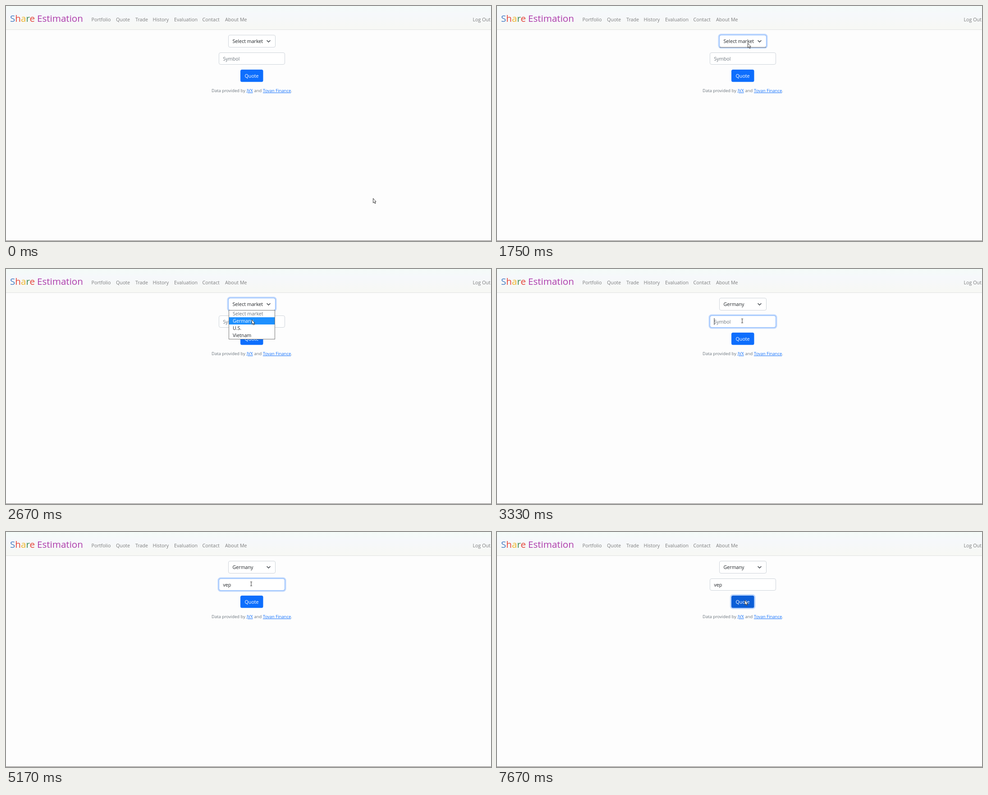
Write an HTML page that moves like this. It is 1076x521 px and loops after 8000 ms.

```html
<!DOCTYPE html>
<html lang="en">
<head>
<meta charset="utf-8">
<title>Quote</title>
<style>
  html, body { margin: 0; width: 100%; height: 100%; overflow: hidden; background: #fdfdfd; }
  svg { display: block; width: 1076px; height: 521px; font: 10.7px "Open Sans", "Noto Sans", sans-serif; fill: #212529; }
  .title { font-size: 20.6px; }
  .nav { fill: #7c7d7e; }
  .hint { fill: #6c757d; }
  .small { font-size: 9.45px; fill: #6c757d; }
  .small .link { fill: #0d6efd; text-decoration: underline; }
  .box { fill: #fff; stroke: #ced4da; }
  .ring rect { fill: none; stroke: #0d6efd; stroke-opacity: .25; stroke-width: 3; }
  .ring .edge { stroke: #86b7fe; stroke-opacity: 1; stroke-width: 1; }
</style>
</head>
<body>
<svg viewBox="0 0 1076 521">
  <defs>
    <linearGradient id="bar" x2="0" y2="1">
      <stop stop-color="#f4fbf8"/>
      <stop offset=".35" stop-color="#f6f8fb"/>
      <stop offset="1" stop-color="#f7f8f4"/>
    </linearGradient>
  </defs>
  <rect width="1076" height="52" fill="url(#bar)"/>
  <rect y="52" width="1076" height="1" fill="#e1e2e2"/>
  <rect y="520" width="1076" height="1" fill="#77716f"/>

  <text class="title" x="9" y="35"><tspan fill="#4a7fc4">S</tspan><tspan fill="#e5483c">h</tspan><tspan fill="#efb62f">a</tspan><tspan fill="#3b8a55">r</tspan><tspan fill="#e5483c">e</tspan></text>
  <text class="title" x="69" y="35" fill="#ad3bab">Estimation</text>
  <g id="nav" class="nav"></g>

  <rect class="box" x="493.5" y="64.5" width="104" height="27" rx="3.5"/>
  <g id="selectRing" class="ring">
    <rect x="492" y="63" width="107" height="30" rx="5"/>
    <rect class="edge" x="493.5" y="64.5" width="104" height="27" rx="3.5"/>
  </g>
  <text id="market" x="502.5" y="82"></text>
  <path d="M579 76.5l3.5 3.5 3.5-3.5" fill="none" stroke="#343a40" stroke-width="1.4" stroke-linecap="round" stroke-linejoin="round"/>

  <rect class="box" x="472.5" y="103.5" width="146" height="26" rx="3.5"/>
  <g id="inputRing" class="ring">
    <rect x="471" y="102" width="149" height="29" rx="5"/>
    <rect class="edge" x="472.5" y="103.5" width="146" height="26" rx="3.5"/>
  </g>
  <text id="symbol" x="481.5" y="120.5"></text>
  <rect id="caret" y="109" width="1" height="15"/>

  <g id="buttonRing" class="ring"><rect x="518.5" y="139.5" width="53.5" height="30" rx="5"/></g>
  <rect id="button" x="520" y="141" width="50.5" height="27.3" rx="3.5"/>
  <text x="529.5" y="159" fill="#fff">Quote</text>

  <g class="small">
    <text x="456" y="191">Data provided by</text>
    <text class="link" x="534" y="191">JVX</text>
    <text x="550.5" y="191">and</text>
    <text x="570" y="191"><tspan class="link">Tovan Finance</tspan>.</text>
  </g>

  <g id="menu">
    <rect id="menuBox" x="494.5" y="91.5" width="102" height="64" fill="#fff" stroke="#767676"/>
    <g id="items">
      <rect id="hover" x="495" y="107" width="101" height="16" fill="#1e90ff"/>
      <text class="hint" x="503" y="103">Select market</text>
      <text id="germany" x="503" y="119">Germany</text>
      <text x="503" y="135">U.S.</text>
      <text x="503" y="151">Vietnam</text>
    </g>
  </g>

  <path id="arrow" d="M.5 .5v10l2.3-2 1.6 3.5 1.6-.7-1.6-3.4h2.7z" fill="#fff" stroke="#222" stroke-width=".9"/>
  <path id="beam" d="M-2 -4.5h1.5l.5 .5 .5-.5H2M0-4V4M-2 4.5h1.5l.5-.5 .5 .5H2" fill="none" stroke="#333"/>
</svg>
<script>
const LOOP = 8000;
const $ = id => document.getElementById(id);
const show = (id, on) => $(id).setAttribute('visibility', on ? 'visible' : 'hidden');
const fade = (id, value) => $(id).setAttribute('opacity', value);
const ramp = (t, from, to) => Math.min(1, Math.max(0, (t - from) / (to - from)));
const within = (t, from, to) => t >= from && t < to;
const latest = (steps, t) => steps.filter(step => step[0] <= t).pop();

const links = [[189.5, 'Portfolio'], [244, 'Quote'], [287, 'Trade'], [325.5, 'History'],
  [373, 'Evaluation'], [435.5, 'Contact'], [486, 'About Me'], [1035.5, 'Log Out']];
$('nav').innerHTML = links.map(([x, label]) => `<text x="${x}" y="33.5">${label}</text>`).join('');

const pointer = [[0, 814, 426], [420, 797, 401.5], [830, 757, 351], [1000, 709, 287],
  [1080, 652, 211], [1170, 600, 141], [1330, 577, 109], [1420, 562, 90], [1500, 556, 82],
  [2170, 554, 90], [2420, 551, 108], [2580, 547, 111], [2670, 545, 112], [2920, 544, 115],
  [5830, 547, 127], [5920, 552, 141], [6080, 551, 147], [6170, 549, 150], [7580, 549.5, 151]];
const typing = [[0, ''], [4330, 'v'], [4420, 've'], [4580, 'vep']];

function draw(t) {
  $('market').textContent = t < 2920 ? 'Select market' : 'Germany';
  fade('selectRing', ramp(t, 1500, 1670) * (t < 3250));
  fade('inputRing', ramp(t, 3200, 3330) - ramp(t, 6580, 6750));
  fade('buttonRing', ramp(t, 6580, 6750));

  const typed = latest(typing, t)[1];
  const symbol = $('symbol');
  symbol.textContent = typed || 'Symbol';
  symbol.setAttribute('class', typed ? '' : 'hint');
  $('caret').setAttribute('x', typed ? 482 + symbol.getComputedTextLength() : 481.5);
  show('caret', within(t, 3250, 4000) || within(t, 4330, 5170) || within(t, 5580, 6080));
  $('button').setAttribute('fill', t < 6080 ? '#0d6efd' : within(t, 6580, 7080) ? '#0a58ca' : '#0b5ed7');

  const open = within(t, 1920, 2920), hover = open && t >= 2420;
  show('menu', within(t, 1750, 2920));
  $('menuBox').setAttribute('height', open ? 64 : .1);
  fade('items', open ? 1 : 0);
  fade('hover', hover ? 1 : 0);
  $('germany').setAttribute('fill', hover ? '#fff' : '#212529');

  const [, x, y] = latest(pointer, t), beam = within(t, 2920, 5830);
  for (const id of ['arrow', 'beam']) {
    show(id, (id === 'beam') === beam);
    $(id).setAttribute('transform', `translate(${x} ${y})`);
  }
}

function tick() {
  draw(performance.now() % LOOP);
  requestAnimationFrame(tick);
}
tick();
</script>
</body>
</html>
```
